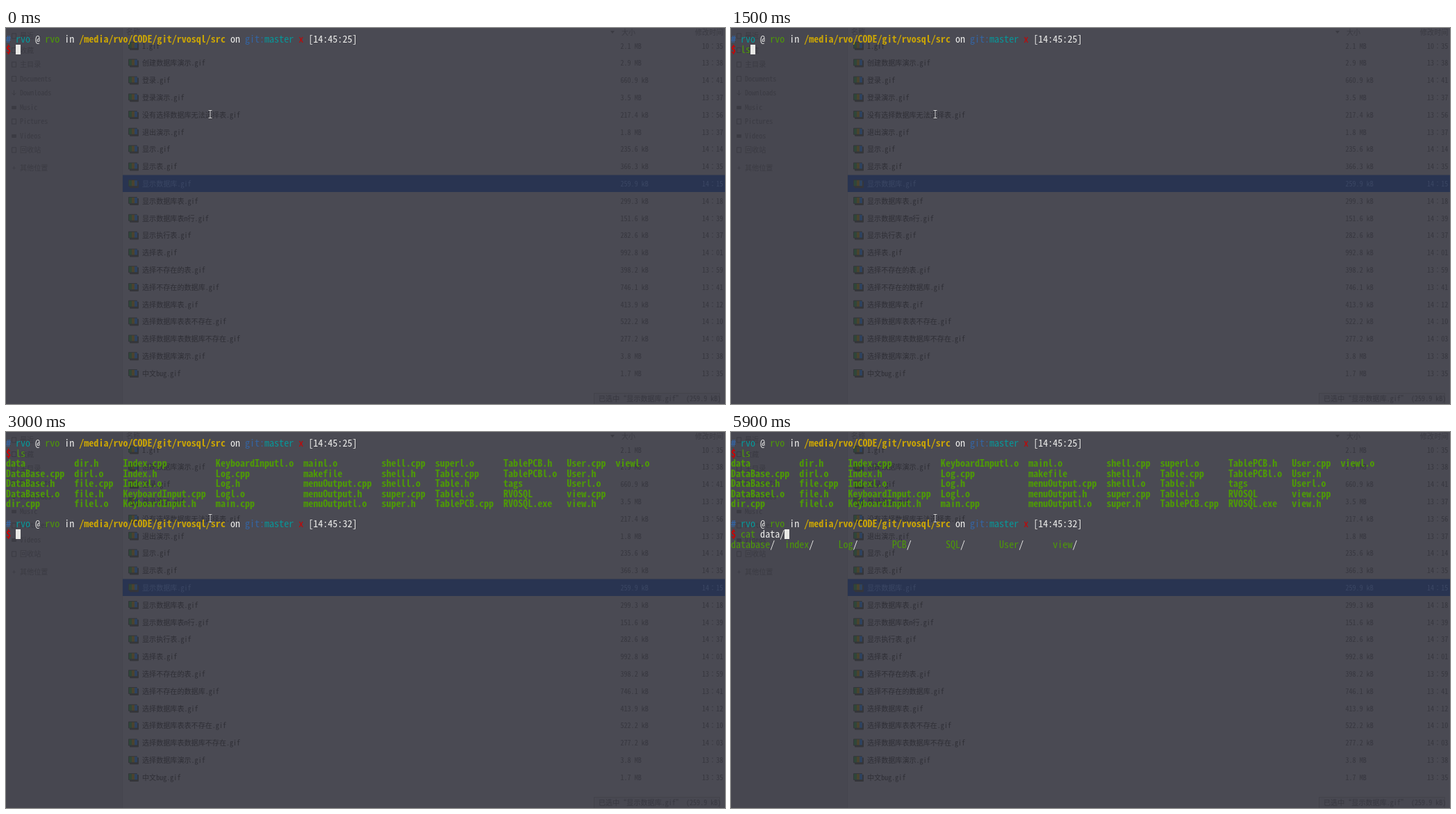
An HTML page with a canvas that plays this animation: 1035x541 px, repeating every 8000 ms.

```html
<!DOCTYPE html>
<html lang="zh">
<head>
<meta charset="utf-8">
<style>
html, body { margin: 0; width: 100%; height: 100%; overflow: hidden; background: #4a4a53; }
canvas { display: block; }
</style>
</head>
<body>
<canvas id="stage" width="1035" height="541"></canvas>
<script>
const ctx = document.getElementById('stage').getContext('2d');
const FONT = '"Noto Sans Mono CJK SC", "Noto Sans CJK SC", "Noto Sans Mono", monospace';
const LOOP = 8000, CELL = 7.02, ROW = 14.56, TOP = 9.4;
const BLUE = '#3465a4', CYAN = '#06989a', GREEN = '#4e9a06', YELLOW = '#c9a406',
  RED = '#cc0000', WHITE = '#eeeeec', HINT = '#5f6067';

const files = `1.gif|2.1 MB|10:35
创建数据库演示.gif|2.9 MB|13:38
登录.gif|660.9 kB|14:41
登录演示.gif|3.5 MB|13:37
没有选择数据库无法选择表.gif|217.4 kB|13:56
退出演示.gif|1.8 MB|13:37
显示.gif|235.6 kB|14:14
显示表.gif|366.3 kB|14:35
显示数据库.gif|259.9 kB|14:15
显示数据库表.gif|299.3 kB|14:18
显示数据库表n行.gif|151.6 kB|14:39
显示执行表.gif|282.6 kB|14:37
选择表.gif|992.8 kB|14:01
选择不存在的表.gif|398.2 kB|13:59
选择不存在的数据库.gif|746.1 kB|13:41
选择数据库表.gif|413.9 kB|14:12
选择数据库表表不存在.gif|522.2 kB|14:10
选择数据库表数据库不存在.gif|277.2 kB|14:03
选择数据库演示.gif|3.8 MB|13:38
中文bug.gif|1.7 MB|13:35`.split('\n').map(line => line.split('|'));

const listing = [
  [0, 'data DataBase.cpp DataBase.h DataBasel.o dir.cpp'],
  [14, 'dir.h dirl.o file.cpp file.h filel.o'],
  [24, 'Index.cpp Index.h Indexl.o KeyboardInput.cpp KeyboardInput.h'],
  [43, 'KeyboardInputl.o Log.cpp Log.h Logl.o main.cpp'],
  [61, 'mainl.o makefile menuOutput.cpp menuOutput.h menuOutputl.o'],
  [77, 'shell.cpp shell.h shelll.o super.cpp super.h'],
  [88, 'superl.o Table.cpp Table.h Tablel.o TablePCB.cpp'],
  [102, 'TablePCB.h TablePCBl.o tags RVOSQL RVOSQL.exe'],
  [115, 'User.cpp User.h Userl.o view.cpp view.h'],
  [125, 'viewl.o']
];

// Command line over time: start, command word, its colour, argument, suggestion
const edits = [
  [0, '', GREEN, '', ''],
  [1900, 'c', RED, '', 'lear'],
  [3000, '', GREEN, '', ''],
  [3200, 'c', RED, '', 'lear'],
  [3500, 'cat', GREEN, '', ''],
  [3700, 'cat', GREEN, ' ', ''],
  [3900, 'cat', GREEN, ' /', 'proc/self/environ'],
  [4700, 'cat', GREEN, ' ', ''],
  [4800, 'cat', GREEN, ' da', ''],
  [5000, 'cat', GREEN, ' data', ''],
  [5300, 'cat', GREEN, ' data/', '']
];

function rect(x, y, w, h, color, radius = 0) {
  ctx.fillStyle = color;
  ctx.beginPath();
  ctx.roundRect(x, y, w, h, radius);
  ctx.fill();
}

function line(points, color, width = 1) {
  ctx.strokeStyle = color;
  ctx.lineWidth = width;
  ctx.beginPath();
  points.forEach(([x, y]) => ctx.lineTo(x, y));
  ctx.stroke();
}

// Monospaced text: CJK characters take two cells. Returns the end x.
function text(s, x, y, cell, color, bold) {
  ctx.font = `${bold ? 'bold ' : ''}${cell * 2}px ${FONT}`;
  ctx.textAlign = 'center';
  ctx.fillStyle = color;
  for (const ch of s) {
    const w = ch > '\u2000' ? cell * 2 : cell;
    ctx.fillText(ch, x + w / 2, y);
    x += w;
  }
  return x;
}

const small = (s, x, mid, color) => text(s, x, mid + 3.7, 5.04, color);

function term(s, col, row, color, bold) {
  text(s, col * CELL, TOP + row * ROW + 11.6, CELL, color, bold);
  return col + s.length;
}

function thumb(y) {
  rect(178, y - 4, 13, 10, '#35363a', 1);
  rect(176, y - 6, 13, 10, '#34373b', 1);
  rect(177, y - 5, 4, 8, '#2f463a');
  rect(181, y - 5, 4, 8, '#4b432f');
  rect(185, y - 5, 4, 8, '#2e425f');
}

function desktop() {
  rect(0, 0, 1035, 541, '#4a4a53');
  rect(0, 0, 167, 541, '#474750');
  rect(167, 0, 1, 541, '#44444d');
  rect(168, 211.5, 867, 24.5, '#293451');

  const dim = '#3b3b43';
  small('名称', 173, 5, dim);
  small('大小', 886, 6, dim);
  small('修改时间', 992, 6, dim);
  ctx.fillStyle = dim;
  ctx.beginPath();
  ctx.moveTo(870, 4); ctx.lineTo(876, 4); ctx.lineTo(873, 8);
  ctx.fill();

  const places = ['最近', '收藏', '主目录', 'Documents', 'Downloads', 'Music', 'Pictures', 'Videos', '回收站'];
  places.forEach((name, i) => {
    const y = 11.5 + i * 20.5;
    small(name, 20, y, dim);
    ctx.strokeStyle = dim;
    ctx.lineWidth = 1;
    if (name === 'Downloads') {
      line([[11.5, y - 4], [11.5, y + 3]], dim);
      line([[8.5, y], [11.5, y + 3], [14.5, y]], dim);
    } else if (name === 'Videos' || name === 'Music') {
      rect(8, y - 2, 7, 5, dim, 1);
    } else {
      ctx.strokeRect(8.5, y - 3.5, 6, 7);
    }
  });
  small('+', 9, 201, dim);
  small('其他位置', 20, 201, dim);

  files.forEach(([name, size, time], i) => {
    const y = 25.8 + i * 24.8, selected = i === 8;
    thumb(y);
    small(name, 196, y, selected ? '#3b4764' : '#2f2f36');
    small(size, 884.5, y, selected ? '#3b4764' : '#37373f');
    small(time.replace(':', '∶'), 1002, y, selected ? '#3b4764' : '#37373f');
  });

  rect(846, 525, 182, 16, '#484851', 3);
  ctx.strokeStyle = '#43434b';
  ctx.lineWidth = 1;
  ctx.strokeRect(846.5, 525.5, 181, 20);
  small('已选中“显示数据库.gif” (259.9 kB)', 853, 533, '#383840');
}

function prompt(row, time) {
  const parts = [['# ', BLUE, 1], ['rvo', CYAN], [' @ ', WHITE], ['rvo', GREEN], [' in ', WHITE],
    ['/media/rvo/CODE/git/rvosql/src', YELLOW, 1], [' on ', WHITE], ['git:', BLUE],
    ['master', CYAN], [' x ', RED], [`[${time}]`, WHITE]];
  parts.reduce((col, [s, color, bold]) => term(s, col, row, color, bold), 0);
  term('$', 0, row + 1, RED, true);
}

function cursor(col, row) {
  rect(Math.round(col * CELL), Math.round(TOP + row * ROW), 7, 14, '#e8e8e6');
}

function commandLine(t) {
  const [, word, color, arg, hint] = edits.findLast(e => t >= e[0]);
  const start = term(word, 2, 9, color, color === RED);
  const end = term(arg, start, 9, WHITE);
  if (arg === ' /') rect((end - 1) * CELL, 153, 7, 1, WHITE);
  term(hint, end, 9, HINT);
  cursor(end, 9);
  term(hint.slice(0, 1), end, 9, '#33333a');
}

function candidates() {
  ctx.save();
  ctx.shadowColor = 'rgba(0,0,0,.35)';
  ctx.shadowBlur = 4;
  ctx.fillStyle = '#f8f8f8';
  ctx.beginPath();
  ctx.moveTo(17, 38); ctx.lineTo(24, 45.5); ctx.lineTo(17, 50);
  ctx.roundRect(17, 45, 201.5, 35.5, 4);
  ctx.fill();
  ctx.restore();
  text('c', 21.5, 57, 4, '#2e3436');
  rect(26, 57, 2.5, 0.8, '#555');
  rect(21.5, 61, 23, 15.5, '#3584e4', 2.5);
  [...'成层槽从查出纯'].forEach((ch, i) => {
    const x = 25 + i * 23.3;
    text(String(i + 1), x, 70.5, 4, i ? '#2e3436' : '#173d70');
    text(ch, x + 7.6, 70.5, 3.9, i ? '#2e3436' : '#ffffff');
  });
  ctx.strokeStyle = '#cdc7c2';
  ctx.lineWidth = 1;
  ctx.strokeRect(188.5, 61.5, 13, 15);
  ctx.strokeRect(201.5, 61.5, 13, 15);
  line([[196.5, 65.5], [193, 69], [196.5, 72.5]], '#929595');
  line([[206, 65.5], [209.5, 69], [206, 72.5]], '#2e3436', 1.4);
}

function pointer() {
  const shape = [[[291.5, 118.5], [296.5, 118.5]], [[294, 118.5], [294, 129.5]], [[291.5, 129.5], [296.5, 129.5]]];
  shape.forEach(p => line(p, '#33333a', 2.6));
  shape.forEach(p => line(p, '#d8d8da', 1));
}

function draw(t) {
  desktop();
  prompt(0, '14:45:25');
  if (t < 1500) {
    cursor(2, 1);
  } else {
    term('ls', 2, 1, GREEN);
    if (t < 1700) cursor(4, 1);
  }
  if (t >= 1700) {
    listing.forEach(([col, names]) =>
      names.split(' ').forEach((name, i) => term(name, col, 2 + i, GREEN, true)));
    if (t < 1800) cursor(0, 7);
  }
  if (t >= 1800) {
    prompt(8, '14:45:32');
    commandLine(t);
  }
  if (t >= 5900) {
    ['database', 'index', 'Log', 'PCB', 'SQL', 'User', 'view'].forEach((name, i) =>
      term('/', term(name, i * 11, 10, GREEN), 10, WHITE));
  }
  if ((t >= 200 && t < 300) || (t >= 1000 && t < 1100)) candidates();
  pointer();
}

const began = performance.now();
function tick() {
  draw((performance.now() - began) % LOOP);
  requestAnimationFrame(tick);
}
tick();
</script>
</body>
</html>
```
